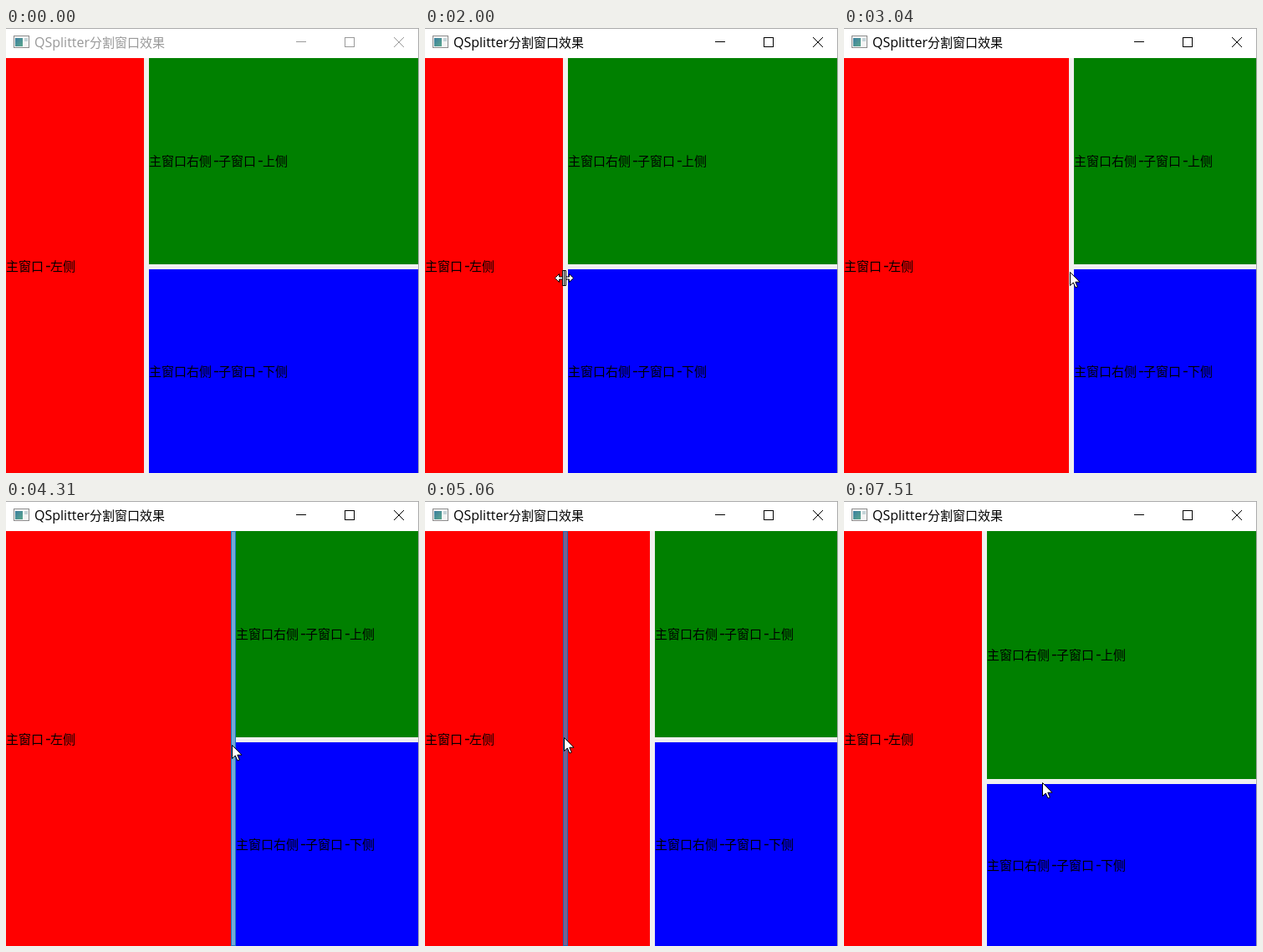
An HTML page for the animation above (8 s loop, 494 by 533 pixels).

```html
<!DOCTYPE html>
<html lang="zh">
<head>
<meta charset="utf-8">
<title>QSplitter</title>
<style>
html, body { margin: 0; width: 100%; height: 100%; overflow: hidden; background: #f0f0f0; }
#win { position: relative; width: 494px; height: 533px; overflow: hidden;
  --split: 165px; --row: 283px; --ink: #999;
  font: 15px/20px "Noto Sans Mono CJK SC", "Noto Sans CJK SC", "Noto Sans CJK", sans-serif; }
#win > * { position: absolute; box-sizing: border-box; }
#bar { left: 0; top: 0; width: 494px; height: 36px; background: #fff; }
#title { left: 34px; top: 7px; color: var(--ink); white-space: nowrap;
  font-family: "Noto Sans CJK SC", "Noto Sans CJK", sans-serif; }
#title span { font: 16px/20px "Open Sans", "Noto Sans", sans-serif; }
#frame { inset: 0; border: solid #aaa; border-width: 1px 1px 0 0; }
.pane { display: flex; align-items: center; overflow: hidden; white-space: nowrap; color: #000; }
.pane div { margin-top: -2px; }
.pane i { display: inline-block; width: 8px; text-align: center; font: 18px/1 "Liberation Mono", monospace; }
#left { left: 0; top: 36px; width: var(--split); bottom: 0; background: #f00; padding-top: 3px; }
#upper, #lower { left: calc(var(--split) + 6px); right: 1px; }
#upper { top: 36px; height: calc(var(--row) - 36px); background: #008000; }
#lower { top: calc(var(--row) + 6px); bottom: 0; background: #00f; padding-top: 2px; }
#band { background: rgba(60, 140, 205, .7); border: 1px solid rgba(0, 104, 184, .75); }
#overlay { left: 0; top: 0; }
</style>
</head>
<body>
<div id="win">
  <div id="bar"></div>
  <div id="title"><span>QSplitter</span>分割窗口效果</div>
  <div id="left" class="pane"><div>主窗口<i>-</i>左侧</div></div>
  <div id="upper" class="pane"><div>主窗口右侧<i>-</i>子窗口<i>-</i>上侧</div></div>
  <div id="lower" class="pane"><div>主窗口右侧<i>-</i>子窗口<i>-</i>下侧</div></div>
  <div id="frame"></div>
  <div id="band"></div>
  <svg id="overlay" width="494" height="533">
    <defs>
      <linearGradient id="screen" x2="1" y2="1">
        <stop stop-color="#3c7fa0"/><stop offset="1" stop-color="#5aa68c"/>
      </linearGradient>
      <g id="resize" stroke="#000">
        <path d="M-11 0L-6-5V-1.5H6V-5L11 0L6 5V1.5H-6V5Z" fill="#fff"/>
        <path d="M-2-9H2V9H-2Z" fill="#fff"/>
        <path d="M0-9V9"/>
      </g>
    </defs>
    <rect x="9.5" y="9.5" width="18" height="14" fill="#f4f4f4" stroke="#8c8c8c"/>
    <rect x="11" y="12" width="9" height="10" fill="url(#screen)"/>
    <rect x="22" y="12" width="4" height="4" fill="#c4d4d8"/>
    <g fill="none" stroke="var(--ink)">
      <path d="M347 16.5h12"/>
      <rect x="405.5" y="11.5" width="11" height="11"/>
      <path d="M464 11L476 23M476 11L464 23"/>
    </g>
    <g id="cursor">
      <path id="arrow" d="M.5.5V16.5L4.3 13L7 19L9.3 18L6.8 12.2H12Z" fill="#fff" stroke="#000"/>
      <use id="across" href="#resize" x=".5" y=".5"/>
      <use id="updown" href="#resize" transform="translate(.5 .5) rotate(90)"/>
    </g>
  </svg>
</div>
<script>
const LOOP = 8000, STEP = 58;
const $ = id => document.getElementById(id);
const win = $('win'), band = $('band'), cursor = $('cursor');

const ENTER = 430, ACTIVATE = 2000;
const drags = {
  widen: { from: 2380, to: 3040 },
  narrow: { from: 4310, to: 5130 },
  lower: { from: 6980, to: 7510 }
};
const during = (t, drag) => t >= drag.from && t < drag.to;

// Each move continues from where the pointer was; bow bends its path vertically.
const entry = { x: 247, y: 490 };
const moves = [
  { from: ENTER, to: 1150, x: 166, y: 310 },
  { from: 1270, to: 1440, x: 166, y: 299 },
  { from: drags.widen.from, to: drags.widen.to, x: 270, y: 292 },
  { from: drags.narrow.from, to: 5060, x: 166, y: 283, bow: -7 },
  { from: 5550, to: 6180, x: 234, y: 287, bow: -3 },
  { from: drags.lower.from, to: 7370, x: 237, y: 330 },
  { from: 7500, to: drags.lower.to, x: 237, y: 337 }
];

function progress(t, { from, to }) {
  const steps = Math.max(1, Math.round((to - from) / STEP));
  const step = Math.floor((t - from) / (to - from) * steps + 1e-6);
  return Math.max(0, Math.min(1, step / steps));
}

function pointerAt(t) {
  let { x, y } = entry;
  for (const move of moves) {
    const p = progress(t, move);
    x += (move.x - x) * p;
    y += (move.y - y) * p + (move.bow || 0) * Math.sin(Math.PI * p);
  }
  return { x: Math.round(x), y: Math.round(y) };
}

function shapeAt(t, { x, y }) {
  if (t < drags.widen.from) return x <= 171 ? 'across' : 'arrow';
  const overRow = t > drags.narrow.to && t < drags.lower.from && x > 171 && y > 283;
  return overRow ? 'updown' : 'arrow';
}

function showBand(x, y, w, h) {
  const box = { left: x, top: y, width: w, height: h };
  for (const side in box) band.style[side] = box[side] + 'px';
}

function draw(t) {
  const { widen, narrow, lower } = drags;
  const wide = t >= widen.to && t < narrow.to;
  win.style.setProperty('--split', wide ? '269px' : '165px');
  win.style.setProperty('--row', t >= lower.to ? '333px' : '283px');
  win.style.setProperty('--ink', t < ACTIVATE ? '#999' : '#000');

  const point = pointerAt(t), shape = shapeAt(t, point);
  cursor.style.display = t < ENTER ? 'none' : '';
  cursor.setAttribute('transform', `translate(${point.x} ${point.y})`);
  for (const id of ['arrow', 'across', 'updown']) $(id).style.display = id === shape ? '' : 'none';

  const sideways = during(t, widen) || during(t, narrow);
  band.style.display = sideways || during(t, lower) ? '' : 'none';
  if (sideways) showBand(point.x - 1, 36, 6, 497);
  else showBand(171, point.y - 4, 322, 6);
}

const origin = performance.now();
function tick() {
  draw((performance.now() - origin) % LOOP);
  requestAnimationFrame(tick);
}
draw(0);
requestAnimationFrame(tick);
</script>
</body>
</html>
```
